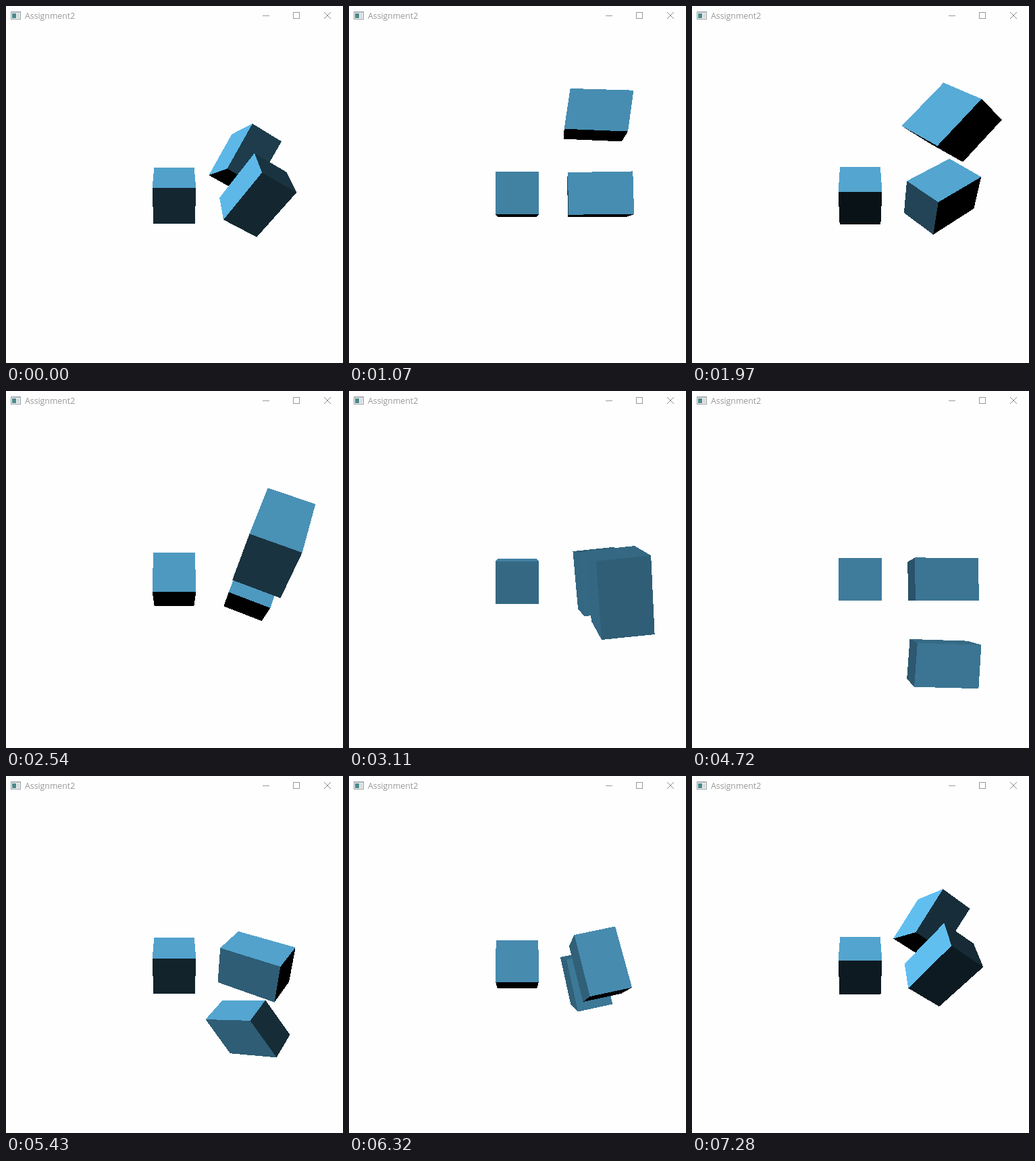
Animation, 499 px wide and 528 px high, one loop 7.31 s. Source, as an HTML page:

```html
<!DOCTYPE html>
<html lang="en">
<head>
<meta charset="utf-8">
<title>Assignment2</title>
<style>
html, body { margin: 0; width: 100%; height: 100%; overflow: hidden; background: #fefefe; }
svg { display: block; }
text { font: 12.3px "Open Sans", "Noto Sans", sans-serif; fill: #999; }
</style>
</head>
<body>
<svg width="499" height="528" viewBox="0 0 499 528">
  <g shape-rendering="crispEdges">
    <path d="M7.5 8.5h14v11h-14z" fill="#f4f4f4" stroke="#9a9fa3"/>
    <path d="M7 8h15v2h-15z" fill="#a9b0b5"/>
    <path d="M9 11h6v7h-6z" fill="#4b8a8c"/>
    <path d="M16 11h4v7h-4z" fill="#d5dcdf"/>
    <path d="M380 14.5h10M425.5 9.5h9v9h-9z" fill="none" stroke="#999"/>
  </g>
  <path d="M471 9l10 10M481 9l-10 10" stroke="#8c8c8c"/>
  <text x="28" y="19">Assignment2</text>
  <g id="scene" shape-rendering="crispEdges"></g>
</svg>
<script>
const LOOP = 7310, SLIPS = [3400, 4900, 5600];
const FOCAL = 603, CAMERA = 10, CX = 249, CY = 280;
const BASE = [103, 203, 255], LIGHT = [-1, 1, 1].map(v => v / Math.sqrt(3));
const scene = document.getElementById('scene');

const dot = (a, b) => a[0] * b[0] + a[1] * b[1] + a[2] * b[2];
const rotX = ([x, y, z], a) => {
  const c = Math.cos(a), s = Math.sin(a);
  return [x, y * c - z * s, y * s + z * c];
};
const rotZ = ([x, y, z], a) => {
  const c = Math.cos(a), s = Math.sin(a);
  return [x * c - y * s, x * s + y * c, z];
};

// Nested chain of boxes; w is 1 for points and 0 for normals.
function pose(box, p, a, w) {
  if (box === 2) p = rotX(p, -a);
  if (box > 0) {
    let [x, y, z] = p;
    y *= w ? 1.5 : 1 / 1.5;
    if (box === 2) z -= 2 * w;
    p = rotZ([x, y, z], -a);
    p[0] += 2 * w;
  }
  return rotX(p, a);
}

function project([x, y, z]) {
  const k = FOCAL / (CAMERA - z);
  return (CX + x * k).toFixed(2) + ',' + (CY - y * k).toFixed(2);
}

function drawBox(box, a) {
  let out = '';
  for (let axis = 0; axis < 3; axis++) {
    for (const side of [-1, 1]) {
      const place = (u, v) => {
        const p = [0, 0, 0];
        p[axis] = side / 2;
        p[(axis + 1) % 3] = u / 2;
        p[(axis + 2) % 3] = v / 2;
        return pose(box, p, a, 1);
      };
      const unit = [0, 0, 0];
      unit[axis] = side;
      const normal = pose(box, unit, a, 0);
      const [x, y, z] = place(0, 0);
      if (dot(normal, [-x, -y, CAMERA - z]) <= 0) continue;
      const lit = Math.min(1, Math.max(0, dot(normal, LIGHT)));
      const fill = BASE.map(c => Math.round(c * lit));
      const points = [[-1, -1], [1, -1], [1, 1], [-1, 1]].map(([u, v]) => project(place(u, v)));
      out += `<polygon points="${points.join(' ')}" fill="rgb(${fill})"/>`;
    }
  }
  return out;
}

function render(now) {
  const t = now % LOOP;
  const delay = 20 - 10 * SLIPS.filter(s => t >= s).length;
  const step = Math.max(0, Math.floor((t - delay) / 30 + 0.001));
  const a = (31.4 + 1.5 * step) * Math.PI / 180;
  const order = Math.cos(a) > 0 ? [0, 2, 1] : [0, 1, 2];
  scene.innerHTML = order.map(box => drawBox(box, a)).join('');
}

function tick() {
  render(performance.now());
  requestAnimationFrame(tick);
}
tick();
</script>
</body>
</html>
```
